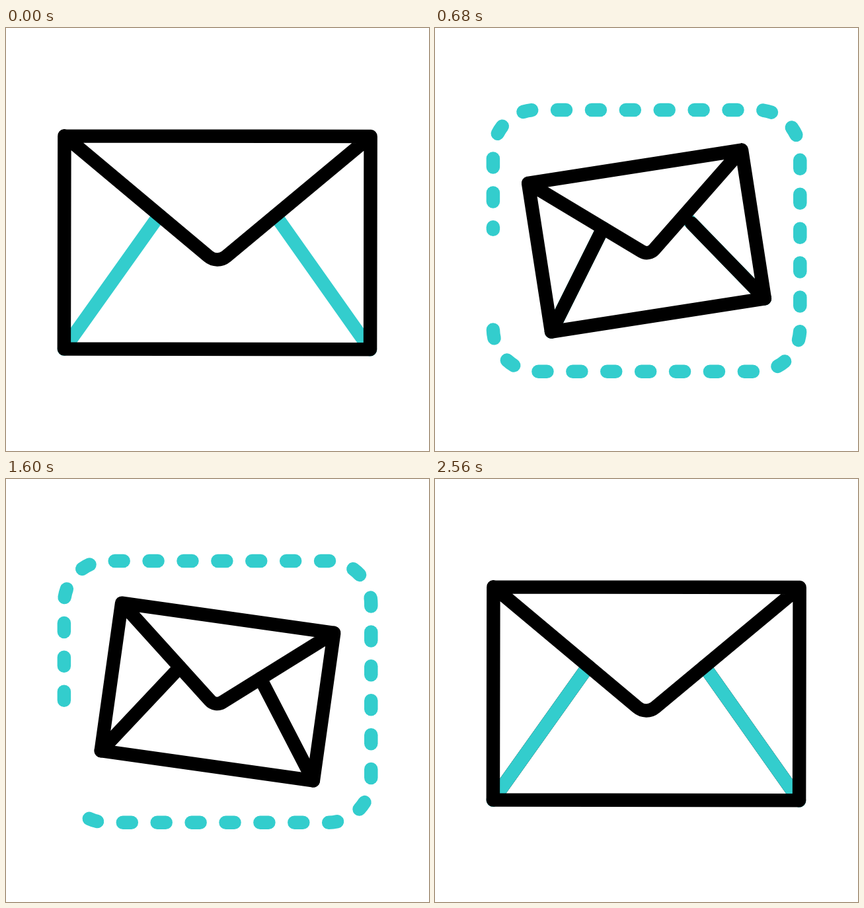
Write an HTML page with a canvas that moves like this. It is 640 by 640 pixels and loops after 2600 ms.

```html
<!DOCTYPE html>
<html lang="en">
<head>
<meta charset="utf-8">
<title>Envelope</title>
<style>
  html, body { margin: 0; overflow: hidden; background: #fff; }
  canvas { display: block; }
</style>
</head>
<body>
<canvas width="640" height="640"></canvas>
<script>
const ctx = document.querySelector('canvas').getContext('2d');
const LOOP = 2600, STEP = 40;
const BLACK = '#000', TEAL = '#33cdcd', LINE = 20.5;

const clamp = u => Math.min(1, Math.max(0, u));
const easeInOut = u => u < .5 ? 4 * u ** 3 : 1 - 4 * (1 - u) ** 3;
const tween = (t, from, to) => easeInOut(clamp((t - from) / (to - from)));

// Cubic Bezier easing with control points (a, 0) and (b, 1)
function bezier(u, a, b) {
  let low = 0, high = 1, p;
  for (let i = 0; i < 30; i++) {
    p = (low + high) / 2;
    const x = 3 * a * (1 - p) ** 2 * p + 3 * b * (1 - p) * p * p + p ** 3;
    if (x < u) low = p; else high = p;
  }
  return p * p * (3 - 2 * p);
}

// Dashed frame, traced counterclockwise from the lower left
const LEFT = 87.9, RIGHT = 552.3, TOP = 123.9, BOTTOM = 519.8, RADIUS = 65;
const PERIMETER = 2 * (RIGHT - LEFT + BOTTOM - TOP) - (8 - 2 * Math.PI) * RADIUS;
const DASH = 13, PITCH = 51.9, DASHES = 31, FIRST = 1.7, SEAM = 37;

const frame = new Path2D();
frame.moveTo(LEFT, BOTTOM - RADIUS);
frame.arcTo(LEFT, BOTTOM, RIGHT, BOTTOM, RADIUS);
frame.arcTo(RIGHT, BOTTOM, RIGHT, TOP, RADIUS);
frame.arcTo(RIGHT, TOP, LEFT, TOP, RADIUS);
frame.arcTo(LEFT, TOP, LEFT, BOTTOM, RADIUS);
frame.lineTo(LEFT, BOTTOM - RADIUS);
frame.arcTo(LEFT, BOTTOM, RIGHT, BOTTOM, RADIUS);

function drawDash(start, end) {
  if (end <= start) return;
  ctx.setLineDash([end - start, 9999]);
  ctx.lineDashOffset = -start;
  ctx.stroke(frame);
}

function drawFrame(t) {
  ctx.strokeStyle = TEAL;
  const growing = t < 1080;
  const tip = growing
    ? PERIMETER * tween(t, 166, 886)
    : SEAM + PERIMETER * (1 - bezier(clamp((t - 1075) / 1374), .92, .3));
  for (let i = 0; i < DASHES; i++) {
    if (growing) {
      const start = FIRST + i * PITCH;
      drawDash(start, Math.min(start + DASH, tip));
    } else {
      const end = tip - i * PITCH;
      drawDash(Math.max(end - DASH, SEAM), end);
    }
  }
  ctx.setLineDash([]);
}

// Envelope, in coordinates around its centre
const HALF_W = 231.6, HALF_H = 161.2, FOLD_X = 143.6, FOLD_Y = 202.5;

function drawEnvelope(t) {
  const shrink = tween(t, 75, 800), swing = tween(t, 860, 1572), grow = tween(t, 1572, 2300);
  const scale = 1 - .3 * (shrink - grow);
  const angle = .1 - 9.1 * shrink + 17 * swing - 7.9 * grow;

  // Scale the path but keep the line weight
  const stroke = (color, trace) => {
    ctx.save();
    ctx.translate(320 - .25 * (scale - .7) / .3, 322 + 2.75 * (scale - .7) / .3);
    ctx.rotate(angle * Math.PI / 180);
    ctx.scale(scale, scale);
    ctx.beginPath();
    trace();
    ctx.restore();
    ctx.strokeStyle = color;
    ctx.stroke();
  };
  const fold = (side, color, part) => part > 0 && stroke(color, () => {
    ctx.moveTo(side * HALF_W, HALF_H);
    ctx.lineTo(side * (HALF_W - FOLD_X * part), HALF_H - FOLD_Y * part);
  });

  const returning = t > 1400;
  for (const [side, delay] of [[-1, 0], [1, 120]]) {
    const start = (returning ? 1725 : 45) + delay;
    fold(side, returning ? BLACK : TEAL, 1);
    fold(side, returning ? TEAL : BLACK, tween(t, start, start + 720));
  }
  stroke(BLACK, () => {
    ctx.rect(-HALF_W, -HALF_H, 2 * HALF_W, 2 * HALF_H);
    ctx.moveTo(-HALF_W, -HALF_H);
    ctx.arcTo(0, 32, HALF_W, -HALF_H, 21);
    ctx.lineTo(HALF_W, -HALF_H);
  });
}

function draw() {
  const t = Math.floor(performance.now() % LOOP / STEP) * STEP;
  ctx.fillStyle = '#fff';
  ctx.fillRect(0, 0, 640, 640);
  ctx.lineWidth = LINE;
  ctx.lineCap = ctx.lineJoin = 'round';
  drawFrame(t);
  drawEnvelope(t);
  requestAnimationFrame(draw);
}
draw();
</script>
</body>
</html>
```
